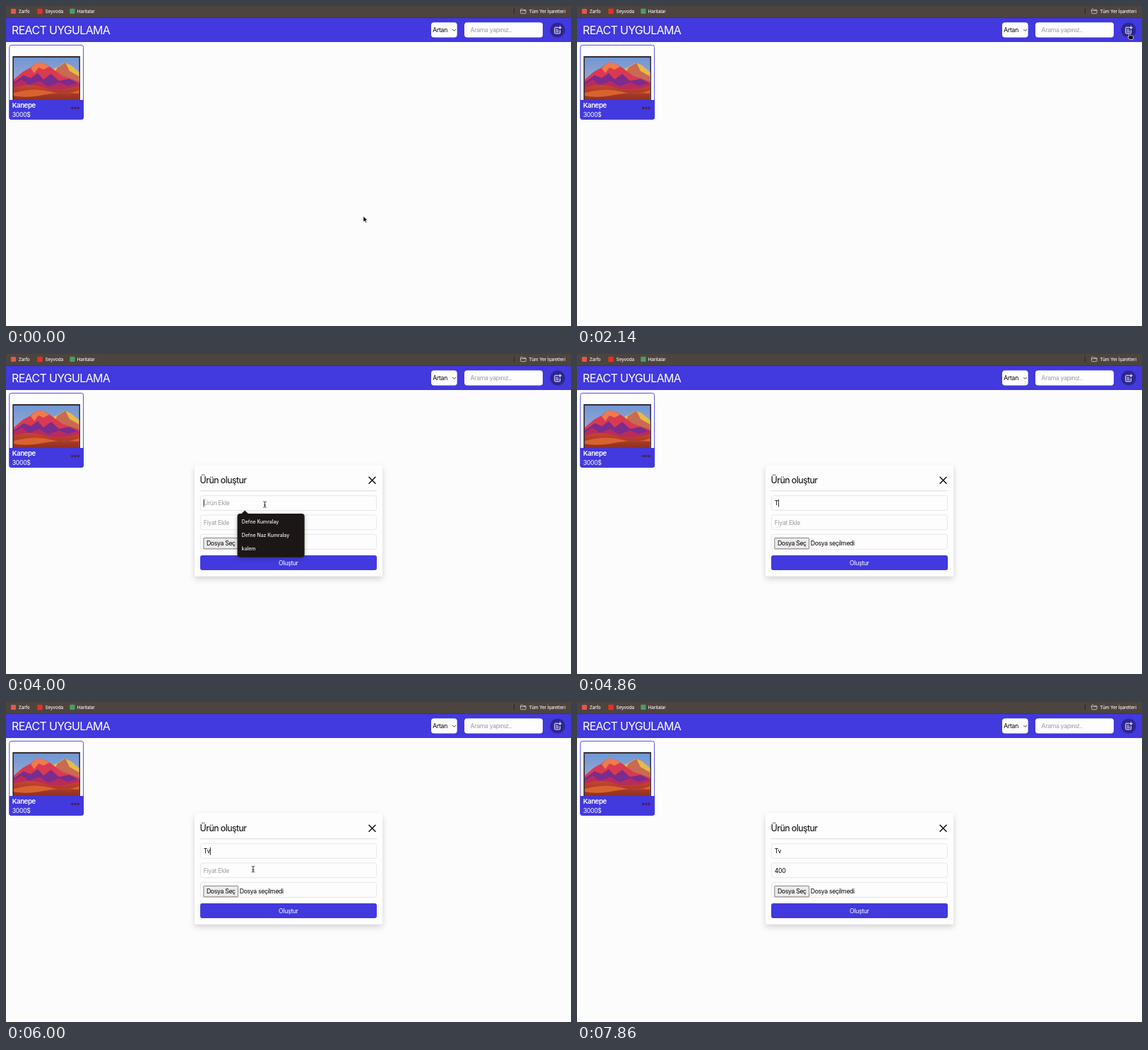
An HTML page that plays this animation: 800 px wide and 453 px high, repeating every 8 s.

```html
<!DOCTYPE html>
<html lang="tr">
<head>
<meta charset="utf-8">
<title>React uygulama</title>
<style>
  html, body { margin: 0; width: 100%; height: 100%; overflow: hidden; background: #fcfcfc; }
  svg { display: block; width: 100vw; height: 100vh; }
  text { font: 400 8.7px Inter, "Noto Sans", sans-serif; letter-spacing: -.33px; fill: #000; white-space: pre; }
  text.mark { font-size: 6.4px; font-weight: 500; letter-spacing: -.12px; fill: #f4f1ef; }
  text.title { font-size: 16px; letter-spacing: -.67px; fill: #fff; }
  text.name { font-size: 9.6px; font-weight: 600; letter-spacing: -.4px; fill: #fff; }
  text.head { font-size: 12.4px; letter-spacing: -.55px; }
  text.hint { fill: #9a9ca3; }
  text.light { fill: #fff; }
  text.mid { text-anchor: middle; }
  text.item { font-size: 6.9px; font-weight: 500; letter-spacing: 0; fill: #f3f1ee; }
  .field { fill: #fdfdfd; stroke: #e0e1e4; stroke-width: .8; }
  .pop { fill: #1b1812; }
  .line { fill: none; stroke-linecap: round; stroke-linejoin: round; }
</style>
</head>
<body>
<svg viewBox="0 0 800 453" preserveAspectRatio="none">
  <defs>
    <linearGradient id="sky" x1="0" y1="0" x2="0" y2="1">
      <stop offset="0" stop-color="#7097d2"/>
      <stop offset="1" stop-color="#b9b4d6"/>
    </linearGradient>
    <linearGradient id="ground" x1="0" y1="0" x2="0" y2="1">
      <stop offset="0" stop-color="#c9452f"/>
      <stop offset="1" stop-color="#8f3022"/>
    </linearGradient>
    <filter id="soft" x="-20%" y="-20%" width="140%" height="150%">
      <feDropShadow dx="0" dy="4" stdDeviation="4" flood-color="#000" flood-opacity=".16"/>
    </filter>
    <filter id="popShade" x="-20%" y="-30%" width="140%" height="170%">
      <feDropShadow dx="0" dy="2" stdDeviation="3" flood-color="#000" flood-opacity=".25"/>
    </filter>
    <clipPath id="screen"><rect x="11" y="73" width="92.5" height="60"/></clipPath>
  </defs>

  <rect width="800" height="453" fill="#fcfcfc"/>

  <!-- bookmark bar -->
  <rect width="800" height="17" fill="#4d4440"/>
  <rect y="16" width="800" height="1" fill="#403936"/>
  <rect x="7" y="4" width="7" height="7" rx="1" fill="#e4574c"/>
  <rect x="44.3" y="3.8" width="7.4" height="7.4" rx="1" fill="#e8301f"/>
  <rect x="90.3" y="3.8" width="7.2" height="7.2" rx="1" fill="#4c9d62"/>
  <text class="mark" x="17.7" y="9.6">Zarfo</text>
  <text class="mark" x="55.4" y="9.6">Seyvoda</text>
  <text class="mark" x="100.6" y="9.6">Haritalar</text>
  <path d="M719.5 3V12" stroke="#2b2624"/>
  <path class="line" d="M728.5 5.2q0-.8.8-.8h2l1 1h3q.8 0 .8.8v3.6q0 .8-.8.8h-6q-.8 0-.8-.8zM728.5 6.6h7.6" stroke="#d5d0cc" stroke-width=".8"/>
  <text class="mark" x="740.6" y="9.6">Tüm Yer İşaretleri</text>

  <!-- header -->
  <rect y="17" width="800" height="34" fill="#4239de"/>
  <text class="title" x="8" y="40">REACT UYGULAMA</text>
  <rect x="602" y="23.3" width="36.7" height="21.2" rx="4" fill="#fdfdfd"/>
  <text x="604.3" y="37.1">Artan</text>
  <path class="line" d="M632.5 33.2l2.1 2.1 2.1-2.1" stroke="#222" stroke-width=".9"/>
  <rect x="649" y="23.3" width="111" height="21.2" rx="4" fill="#fdfdfd"/>
  <text class="hint" x="657.6" y="37.1">Arama yapınız..</text>
  <circle cx="781" cy="34" r="10.6" fill="#2d268f"/>
  <g class="line" stroke="#fff" stroke-width="1">
    <path d="M781.5 30.2h-3.7q-1 0-1 1v6.7q0 1 1 1h5.7q1 0 1-1v-3.2"/>
    <path d="M778.8 33h2.4M778.8 34.8h3.6M778.8 36.6h3.6" stroke-width=".8"/>
    <path d="M784.4 28.7v4M782.4 30.7h4"/>
  </g>

  <!-- product card -->
  <rect x="4.8" y="55.4" width="104.8" height="105" rx="3" fill="#fdfdfd" stroke="#4239de" stroke-width=".9"/>
  <rect x="9.3" y="71" width="95.7" height="62" fill="#332b35"/>
  <g clip-path="url(#screen)">
    <rect x="11" y="73" width="93" height="60" fill="url(#sky)"/>
    <path d="M60 92L74 86 83 80 92 84 104 94V120H60z" fill="#e9b948"/>
    <path d="M72 88L84 80 90 92 104 100V120H62z" fill="#c96a52"/>
    <path d="M11 104L24 93 35 87 43 80 54 81 65 88 80 99 104 107V126H11z" fill="#d93a52"/>
    <path d="M35 88L43 80 54 81 61 86 53 90 46 87 40 95z" fill="#ef7b4d"/>
    <path d="M11 108L25 98 35 102 45 95 53 104 64 96 75 106 90 103 104 110V124H11z" fill="#7a2d8c"/>
    <path d="M11 111L22 104 33 112 47 106 60 114 75 108 88 113 104 108V128H11z" fill="#b92b5c"/>
    <path d="M11 116Q32 108 52 115T104 113V133H11z" fill="url(#ground)"/>
    <path d="M11 123Q40 115 62 121T104 119V124Q76 121 52 126T11 127z" fill="#d9632f"/>
  </g>
  <path d="M4.4 133H110V157.8q0 3-3 3H7.4q-3 0-3-3z" fill="#4239de"/>
  <text class="name" x="8.7" y="144">Kanepe</text>
  <text class="light" x="8.8" y="157">3000$</text>
  <g fill="#541a58">
    <circle cx="93.8" cy="144.5" r="1.7"/><circle cx="98" cy="144.5" r="1.7"/><circle cx="102.2" cy="144.5" r="1.7"/>
  </g>

  <!-- dialog -->
  <g id="dialog">
    <rect x="267" y="157.5" width="266" height="157" rx="2" fill="#fdfdfd" filter="url(#soft)"/>
    <text class="head" x="274.6" y="183.4">Ürün oluştur</text>
    <path class="line" d="M514 174.2l9 9M523 174.2l-9 9" stroke="#000" stroke-width="1.4"/>
    <path d="M275 193.7H525" stroke="#d6d7da" stroke-width=".9"/>
    <rect class="field" x="275.4" y="200.6" width="249.2" height="20.8" rx="3"/>
    <rect class="field" x="275.4" y="228" width="249.2" height="20.6" rx="3"/>
    <rect class="field" x="275.4" y="255.4" width="249.2" height="21" rx="3"/>
    <text id="product" x="279.8" y="214.2"></text>
    <text id="price" x="279.8" y="241.8"></text>
    <rect x="279.8" y="260.4" width="48.8" height="15.4" rx=".8" fill="#ebebeb" stroke="#686868" stroke-width=".8"/>
    <text x="283.9" y="271.2">Dosya Seç</text>
    <text x="330.7" y="271.2">Dosya seçilmedi</text>
    <rect x="275" y="285" width="250" height="21" rx="3" fill="#4239de"/>
    <text class="light mid" x="399.8" y="298.6">Oluştur</text>
    <rect id="caret" width=".9" height="10.6" fill="#111"/>
  </g>

  <g id="names" filter="url(#popShade)">
    <path class="pop" d="M332.5 227L338.2 221.4 344 227z"/>
    <rect class="pop" x="327.5" y="226" width="95.2" height="61.7" rx="4"/>
    <text class="item" x="333.8" y="240.4">Defne Kumralay</text>
    <text class="item" x="333.8" y="259.4">Defne Naz Kumralay</text>
    <text class="item" x="333.8" y="278.4">kalem</text>
  </g>
  <g id="prices" filter="url(#popShade)">
    <path class="pop" d="M332.5 254.5L338.2 249 344 254.5z"/>
    <rect class="pop" x="327.5" y="253.5" width="82.6" height="23.5" rx="4"/>
    <text class="item" x="333.8" y="268">30</text>
  </g>

  <!-- pointers, hot spot at the origin -->
  <path id="arrow" d="M0 0V8.2L1.9 6.5 3.2 9.4 4.6 8.8 3.4 6H6z" fill="#000" stroke="#fff" stroke-width=".7"/>
  <path id="hand" d="M-.9.8q.9-1.1 1.8 0V4q.9-.7 1.6.1.9-.5 1.5.3 1.2-.3 1.3.9V7L4.4 9.4H.1L-2.3 6q-.3-1.3.7-1.2l.7.7z" fill="#000" stroke="#fff" stroke-width=".7"/>
  <g id="beam" class="line">
    <path d="M-1.8-4.2Q0-4.2 0-3V3Q0 4.2-1.8 4.2M1.8-4.2Q0-4.2 0-3M0 3Q0 4.2 1.8 4.2M-1 .9H1" stroke="#fff" stroke-width="1.8"/>
    <path d="M-1.8-4.2Q0-4.2 0-3V3Q0 4.2-1.8 4.2M1.8-4.2Q0-4.2 0-3M0 3Q0 4.2 1.8 4.2M-1 .9H1" stroke="#222" stroke-width=".9"/>
  </g>
</svg>
<script>
  const LOOP = 8000, FPS = 7;
  const $ = id => document.getElementById(id);
  const show = (id, on) => $(id).setAttribute('visibility', on ? 'visible' : 'hidden');
  const within = (t, from, to) => t >= from && t < to;

  // pointer path: time, x, y
  const path = [
    [0, 506, 297.5], [430, 618, 184], [860, 618, 184], [2000, 782.3, 38],
    [2290, 782.3, 38], [2860, 377.8, 192], [3140, 363.5, 206], [3430, 366.5, 213],
    [5290, 366.5, 213], [5570, 355, 223.5], [6140, 349, 239], [8000, 349, 239]
  ];
  // typing: time, text
  const productKeys = [[3710, ''], [4710, 'T'], [5000, 'Tv']];
  const priceKeys = [[6430, ''], [7000, '4'], [7140, '40'], [7290, '400']];

  const smooth = u => u * u * (3 - 2 * u);

  function pointerAt(t) {
    const i = Math.max(1, path.findIndex(p => p[0] >= t));
    const [t0, x0, y0] = path[i - 1], [t1, x1, y1] = path[i];
    const u = smooth((t - t0) / (t1 - t0));
    return [x0 + (x1 - x0) * u, y0 + (y1 - y0) * u];
  }

  const lastKey = (keys, t) => keys.filter(k => k[0] <= t).pop();

  function fill(id, keys, hint, t) {
    const key = lastKey(keys, t), value = key ? key[1] : '';
    const el = $(id);
    el.textContent = value || hint;
    el.setAttribute('class', value ? '' : 'hint');
    return value ? el.getComputedTextLength() : 0;
  }

  function drawCaret(t, productWidth, priceWidth) {
    const inPrice = t >= priceKeys[0][0];
    const key = lastKey(inPrice ? priceKeys : productKeys, t);
    show('caret', key && Math.floor((t - key[0]) / 500) % 2 === 0);
    $('caret').setAttribute('x', 279.6 + (inPrice ? priceWidth : productWidth));
    $('caret').setAttribute('y', inPrice ? 233.2 : 205.8);
  }

  function drawPointer(t) {
    const [x, y] = pointerAt(t);
    const visible = !within(t, 4710, 5430) && t < 6710;
    const overAdd = Math.hypot(x - 781, y - 34) < 10.6;
    const overField = t > 2900;
    const kind = overAdd ? 'hand' : overField ? 'beam' : 'arrow';
    for (const id of ['arrow', 'hand', 'beam']) {
      show(id, visible && id === kind);
      $(id).setAttribute('transform', `translate(${x} ${y})`);
    }
  }

  function draw(ms) {
    const step = Math.floor((ms % LOOP + 3) * FPS / 1000) % (LOOP * FPS / 1000);
    const t = Math.round(step * 100 / FPS) * 10;
    const open = t >= 2430;
    $('dialog').style.display = open ? '' : 'none';
    if (open) {
      const a = fill('product', productKeys, 'Ürün Ekle', t);
      const b = fill('price', priceKeys, 'Fiyat Ekle', t);
      drawCaret(t, a, b);
    } else show('caret', false);
    show('names', within(t, 4000, 4710));
    show('prices', within(t, 6430, 7000));
    drawPointer(t);
  }

  const start = performance.now();
  function tick() {
    draw(performance.now() - start);
    requestAnimationFrame(tick);
  }
  tick();
</script>
</body>
</html>
```
